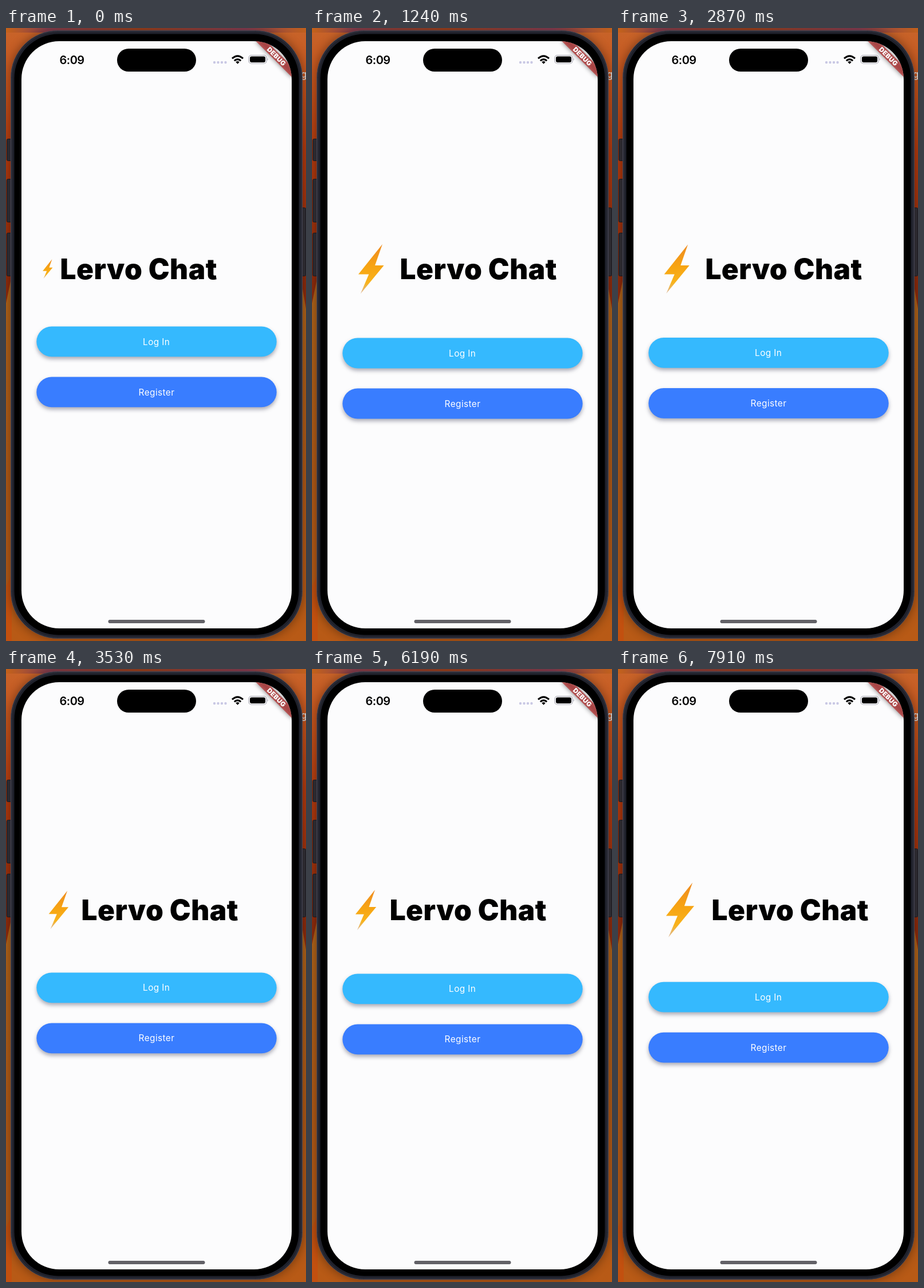
Recreate the animation shown at these times as an HTML page. Size 524x1069 px, loop 8 s.

```html
<!DOCTYPE html>
<html lang="en">
<head>
<meta charset="utf-8">
<title>Chat welcome screen</title>
<style>
  html, body { margin: 0; width: 100%; height: 100%; overflow: hidden; background: #a8470f; }
  svg { display: block; width: 100%; height: 100%; }
  text { font-family: Inter, Roboto, sans-serif; }
  .button { filter: drop-shadow(0 4px 3.5px rgba(0, 0, 30, .32)); }
  .label { font-size: 15.4px; letter-spacing: .4px; fill: #fff; text-anchor: middle; }
</style>
</head>
<body>
<svg viewBox="0 0 524 1069" preserveAspectRatio="none">
  <defs>
    <linearGradient id="wall" x2="0" y2="1">
      <stop offset="0" stop-color="#c8642a"/>
      <stop offset=".1" stop-color="#c4511a"/>
      <stop offset=".2" stop-color="#b43a0e"/>
      <stop offset=".42" stop-color="#8f2b0c"/>
    </linearGradient>
    <linearGradient id="low" x2="0" y2="1">
      <stop offset="0" stop-color="#b0641a"/>
      <stop offset=".55" stop-color="#b25a16"/>
      <stop offset="1" stop-color="#b85a16"/>
    </linearGradient>
    <linearGradient id="top">
      <stop offset="0" stop-color="#c4621a"/>
      <stop offset=".14" stop-color="#8a3f50"/>
      <stop offset=".45" stop-color="#a0431f"/>
      <stop offset=".8" stop-color="#8b3f55"/>
      <stop offset="1" stop-color="#c0601c"/>
    </linearGradient>
    <linearGradient id="flame" x2="0" y2="1">
      <stop offset="0" stop-color="#ee8b22"/>
      <stop offset=".45" stop-color="#f7a412"/>
      <stop offset=".78" stop-color="#f8b31c"/>
      <stop offset="1" stop-color="#dcb9a0"/>
    </linearGradient>
    <clipPath id="screen"><rect x="27" y="23" width="472" height="1024" rx="66"/></clipPath>
    <filter id="soft" x="-50%" y="-150%" width="200%" height="400%"><feGaussianBlur stdDeviation="4"/></filter>
    <filter id="shade"><feGaussianBlur stdDeviation="9"/></filter>
  </defs>

  <!-- Desktop behind the phone -->
  <rect width="524" height="1069" fill="url(#wall)"/>
  <path d="M0 480L10 432H514L524 490V1069H0Z" fill="url(#low)"/>
  <path d="M0 974L10 952V1069H0Z" fill="#c2500f"/>
  <rect width="524" height="8" fill="url(#top)"/>
  <text x="515" y="87" font-size="17" font-weight="600" fill="#dcd5d3">g</text>
  <rect x="8" y="4" width="510" height="1061" rx="82" opacity=".4" filter="url(#shade)"/>

  <!-- Phone body -->
  <g fill="#2b292f" stroke="#1b191e">
    <rect x="1.5" y="193.5" width="10" height="38" rx="2"/>
    <rect x="1.5" y="263.5" width="10" height="75" rx="2"/>
    <rect x="1.5" y="357.5" width="10" height="75" rx="2"/>
    <rect x="514" y="313.5" width="9.5" height="119" rx="2"/>
  </g>
  <rect x="8.5" y="4.5" width="509" height="1060" rx="82" fill="#1f212b" stroke="#4b4a58"/>
  <rect x="10.5" y="6.5" width="505" height="1056" rx="80" fill="none" stroke="#34343f"/>
  <rect x="14.5" y="10.5" width="497" height="1048" rx="77"/>
  <rect x="27" y="23" width="472" height="1024" rx="66" fill="#fcfcfd"/>

  <!-- Status bar -->
  <text x="93.5" y="62.5" font-size="20" font-weight="600" letter-spacing="-.5">6:09</text>
  <rect x="194" y="36" width="138" height="40" rx="20"/>
  <g fill="#c9c8e4">
    <circle cx="364" cy="60" r="2.2"/><circle cx="370.5" cy="60" r="2.2"/>
    <circle cx="377" cy="60" r="2.2"/><circle cx="383.5" cy="60" r="2.2"/>
  </g>
  <g fill="none" stroke="#000" stroke-width="3">
    <path d="M395 53.2Q404.500 44.500 414 53.2"/>
    <path d="M398.800 57.2Q404.500 52 410.200 57.2"/>
  </g>
  <path d="M401.300 59.3Q404.500 56.700 407.700 59.3L404.500 62.800Z"/>
  <rect x="424" y="47.5" width="31" height="14.5" rx="4.5" fill="none" stroke="#a9a9b4" stroke-width="1.2"/>
  <rect x="426" y="49.5" width="27" height="10.5" rx="3"/>
  <path d="M456.500 52.5q2.400 2.200 0 4.500Z" fill="#a9a9b4"/>

  <g clip-path="url(#screen)">
    <g transform="translate(499 23) rotate(45)">
      <rect x="-44" y="31" width="88" height="13.2" opacity=".5" filter="url(#soft)"/>
      <rect x="-44" y="31" width="88" height="13.2" fill="#b71c1c" fill-opacity=".63"/>
      <text y="41.7" font-size="11.4" font-weight="900" letter-spacing=".3" fill="#fff" text-anchor="middle">DEBUG</text>
    </g>
  </g>

  <!-- Moving content -->
  <path id="bolt" d="M.72 -.438L.286 .097H.475L.325 .443L.747 -.062H.586Z" fill="url(#flame)"/>
  <text id="title" y="438.3" font-size="49.4" font-weight="900" letter-spacing=".5">Lervo Chat</text>
  <g id="buttons">
    <rect class="button" x="53.3" y="520.5" width="419.4" height="52.8" rx="26.4" fill="#35b9fe"/>
    <text class="label" x="262.7" y="552.5">Log In</text>
    <rect class="button" x="53.3" y="608.5" width="419.4" height="52.8" rx="26.4" fill="#397dff"/>
    <text class="label" x="263" y="640.5">Register</text>
  </g>

  <rect x="178.5" y="1032" width="169" height="6" rx="3" fill="#626167"/>
</svg>
<script>
  const LOOP = 8000, LEFT = 53.3, TITLE_LEFT = 56.8, MID = 420, ROW = 58;
  const LOGO_W = 108.2, LOGO_H = 109.8;
  const [bolt, title, buttons] = ['bolt', 'title', 'buttons'].map(id => document.getElementById(id));

  // [step, phase]: even phases are the smallest logo, odd ones the largest
  const keys = [[0, .193], [26, .675], [46, 1.061], [76, 1.556], [106, 2.009], [133, 2.479], [171, 3.114]];

  // Steps come in threes, held for 20, 20 and 100 ms, with one slip in the rhythm
  function stepAt(ms) {
    const [t, first] = ms < 2270 ? [ms + 20, -1] : [ms - 2270, 49];
    return first + 3 * Math.floor(t / 140) + Math.min(2, Math.floor(t % 140 / 20));
  }

  function phaseAt(step) {
    const i = Math.max(1, keys.findIndex(k => k[0] >= step));
    const [n0, p0] = keys[i - 1], [n1, p1] = keys[i];
    return p0 + (p1 - p0) * (step - n0) / (n1 - n0);
  }

  function draw(ms) {
    const toTop = Math.abs(phaseAt(stepAt(ms)) % 2 - 1);
    const size = 1 - toTop * toTop;
    const w = LOGO_W * size, h = LOGO_H * size;
    bolt.setAttribute('transform', `translate(${LEFT} ${MID}) scale(${w} ${h})`);
    title.setAttribute('x', TITLE_LEFT + w);
    buttons.setAttribute('transform', `translate(0 ${Math.max(0, h - ROW) / 2})`);
  }

  const start = performance.now();
  function tick() {
    draw((performance.now() - start) % LOOP);
    requestAnimationFrame(tick);
  }
  tick();
</script>
</body>
</html>
```
